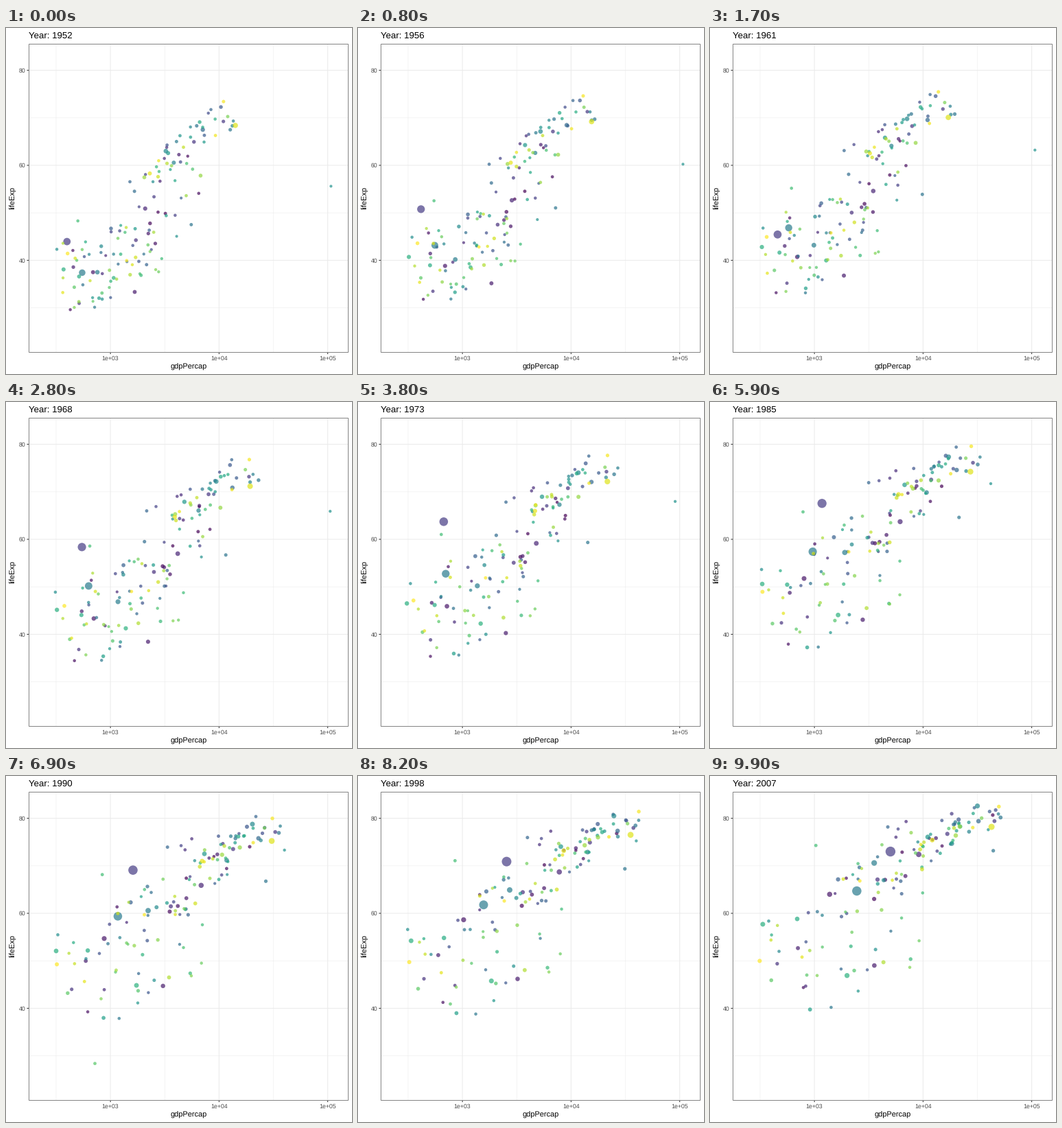
A matplotlib script for the animation above (10 s loop, 504 by 504 pixels).

```python
import numpy as np
import matplotlib
import matplotlib.pyplot as plt
from matplotlib.animation import FuncAnimation
from matplotlib.patches import Rectangle

plt.rcParams["font.family"] = "Liberation Sans"
plt.rcParams["text.hinting"] = "none"

SIZE, DPI = 504, 72
FRAMES, INTERVAL = 100, 100
FIRST, LAST = 1952, 2007
LEFT, TOP, RIGHT, BOTTOM = 33.2, 23.2, 498.5, 472.3
DOTS = 142
T = np.linspace(0, 1, 12)  # one survey every five years


def rise(start, end, power=1.0):
    return start + (end - start) * T ** power


def dip(year, depth, width):
    return depth * np.exp(-((FIRST + T * (LAST - FIRST) - year) / width) ** 2 / 2)


def drop(depth, centre):
    return depth / (1 + np.exp(-25 * (T - centre)))


def radius(pop):
    return 2 + 5.2 * np.sqrt(pop / 1318)


def leaders():
    """Colour rank, log income, life span and population (millions)."""
    return [
        (24, rise(2.60, 3.70, 1.65), rise(44, 73, 0.4) - dip(1962, 14, 3),
         rise(556, 1318, 0.85)),
        (58, rise(2.74, 3.39, 1.9), rise(37.4, 64.7, 0.6), rise(372, 1110)),
        (72, 5.03 - drop(0.43, 0.46), rise(55.6, 77.6, 0.6), rise(0.2, 2.5)),
        (104, rise(2.69, 2.93), rise(40, 47) - dip(1992, 22, 3), rise(2.5, 9)),
        (134, rise(4.15, 4.63), rise(68.4, 78.2), rise(158, 301)),
        (66, rise(3.51, 4.50, 0.6), rise(63, 82.6, 0.6), rise(86, 127)),
        (59, rise(2.88, 3.55), rise(37.5, 70.6), rise(82, 223)),
        (14, rise(3.32, 3.96, 0.6), rise(50.9, 72.4), rise(57, 190)),
        (47, rise(3.85, 4.51, 0.7), rise(67.5, 79.4), rise(69, 82)),
        (8, rise(2.84, 3.14, 3), rise(37.5, 64, 1.2), rise(47, 150)),
        (90, rise(3.03, 3.30, 0.7), rise(36.3, 46.9, 0.6), rise(33, 135)),
    ]


# count, typical population, link between income and life span,
# then start and end of: mean income, its spread, mean life span, its spread
REGIONS = [
    (32, 7, 0.85, (3.76, 4.33), (0.23, 0.21), (65.5, 78), (4.3, 2.5)),
    (23, 3, 0.60, (3.47, 3.87), (0.23, 0.26), (52.5, 73), (7.5, 3.6)),
    (26, 8, 0.65, (3.18, 3.80), (0.34, 0.48), (46.0, 71), (8.5, 6.0)),
    (50, 4, 0.40, (2.99, 3.24), (0.28, 0.42), (38.7, 55), (5.0, 8.6)),
]


def scores(rng, n):
    """Evenly spread scores that drift slowly, one row per dot."""
    a, b = (rng.permutation(np.linspace(-1.7, 1.7, n))[:, None] for _ in "ab")
    return a * np.cos(0.6 * T) + b * np.sin(0.6 * T)


def region(rng, n, pop, link, income, income_sd, life, life_sd):
    zx = scores(rng, n)
    zy = link * zx + np.sqrt(1 - link ** 2) * scores(rng, n)
    zx, zy = np.clip([zx, zy], -1.75, 1.75)
    x = rise(*income, 0.85) + rise(*income_sd) * zx
    y = rise(*life, 0.75) + rise(*life_sd) * zy
    x += rng.normal(0, 0.02, x.shape)
    y += rng.normal(0, 0.25, y.shape)
    size = np.clip(pop * np.exp(rng.normal(0, 1.1, n)), 0.2, 50)
    return x, y, size[:, None] * rise(1, 2.2)


def build():
    rng = np.random.default_rng(7)
    ranks, *series = (np.array(c) for c in zip(*leaders()))
    free = rng.permutation(np.setdiff1d(np.arange(DOTS), ranks))
    ranks = np.append(ranks, free)
    parts = [series] + [region(rng, *r) for r in REGIONS]
    x, y, pop = (np.vstack(p) for p in zip(*parts))
    order = np.argsort(ranks)
    return ranks[order], x[order], y[order], radius(pop[order])


def px(log_income):
    return LEFT + (log_income - 2.2487) * (RIGHT - LEFT) / 2.94


def py(life):
    return TOP + (85.553 - life) * (BOTTOM - TOP) / 64.904


fig = plt.figure(figsize=(SIZE / DPI, SIZE / DPI), dpi=DPI, facecolor="white")
ax = fig.add_axes([0, 0, 1, 1])
ax.set(xlim=(0, SIZE), ylim=(SIZE, 0))
ax.axis("off")


def line(xs, ys, color, width, z):
    ax.plot(xs, ys, color=color, lw=width, zorder=z, snap=False,
            solid_capstyle="butt")


def vline(x, width=1.07):
    line([px(x)] * 2, [TOP, BOTTOM], "#ebebeb", width, 1)


def hline(y, width=1.07):
    line([LEFT, RIGHT], [py(y)] * 2, "#ebebeb", width, 1)


for x in (2.5, 3.5, 4.5):
    vline(x, 0.53)
for y in (30, 50, 70):
    hline(y, 0.53)
for x in (3, 4, 5):
    vline(x)
    line([px(x)] * 2, [BOTTOM, BOTTOM + 2.75], "#333333", 1.07, 4)
    ax.text(px(x), 484, f"1e+0{x}", size=8.8, color="#4d4d4d", ha="center")
for y in (40, 60, 80):
    hline(y)
    line([LEFT - 2.75, LEFT], [py(y)] * 2, "#333333", 1.07, 4)
    ax.text(28.2, py(y) + 3.2, str(y), size=8.8, color="#4d4d4d", ha="right")

# a one-pixel frame on pixel centres
ax.add_patch(Rectangle((33.5, 23.5), 465, 449, fill=False, ec="#858585", lw=1,
                       zorder=4, snap=False))
ax.text((LEFT + RIGHT) / 2, 497, "gdpPercap", size=11, ha="center")
ax.text(13, (TOP + BOTTOM) / 2, "lifeExp", size=11, rotation=90,
        rotation_mode="anchor", ha="center", va="baseline")
title = ax.text(LEFT, 15, "", size=13.2)

ranks, log_income, life, radii = build()
colors = matplotlib.colormaps["viridis"](ranks / (DOTS - 1))
dots = ax.scatter(px(log_income[:, 0]), py(life[:, 0]), c=colors, alpha=0.7,
                  linewidths=0, zorder=3)


def update(frame):
    pos = frame / (FRAMES - 1) * (len(T) - 1)
    k = min(int(pos), len(T) - 2)

    def tween(values):
        return values[:, k] + (values[:, k + 1] - values[:, k]) * (pos - k)

    dots.set_offsets(np.column_stack([px(tween(log_income)), py(tween(life))]))
    dots.set_sizes((2 * tween(radii)) ** 2)
    title.set_text(f"Year: {round(FIRST + 5 * pos)}")
    return dots, title


anim = FuncAnimation(fig, update, frames=FRAMES, interval=INTERVAL,
                     repeat=True, repeat_delay=0)
plt.show()
```
